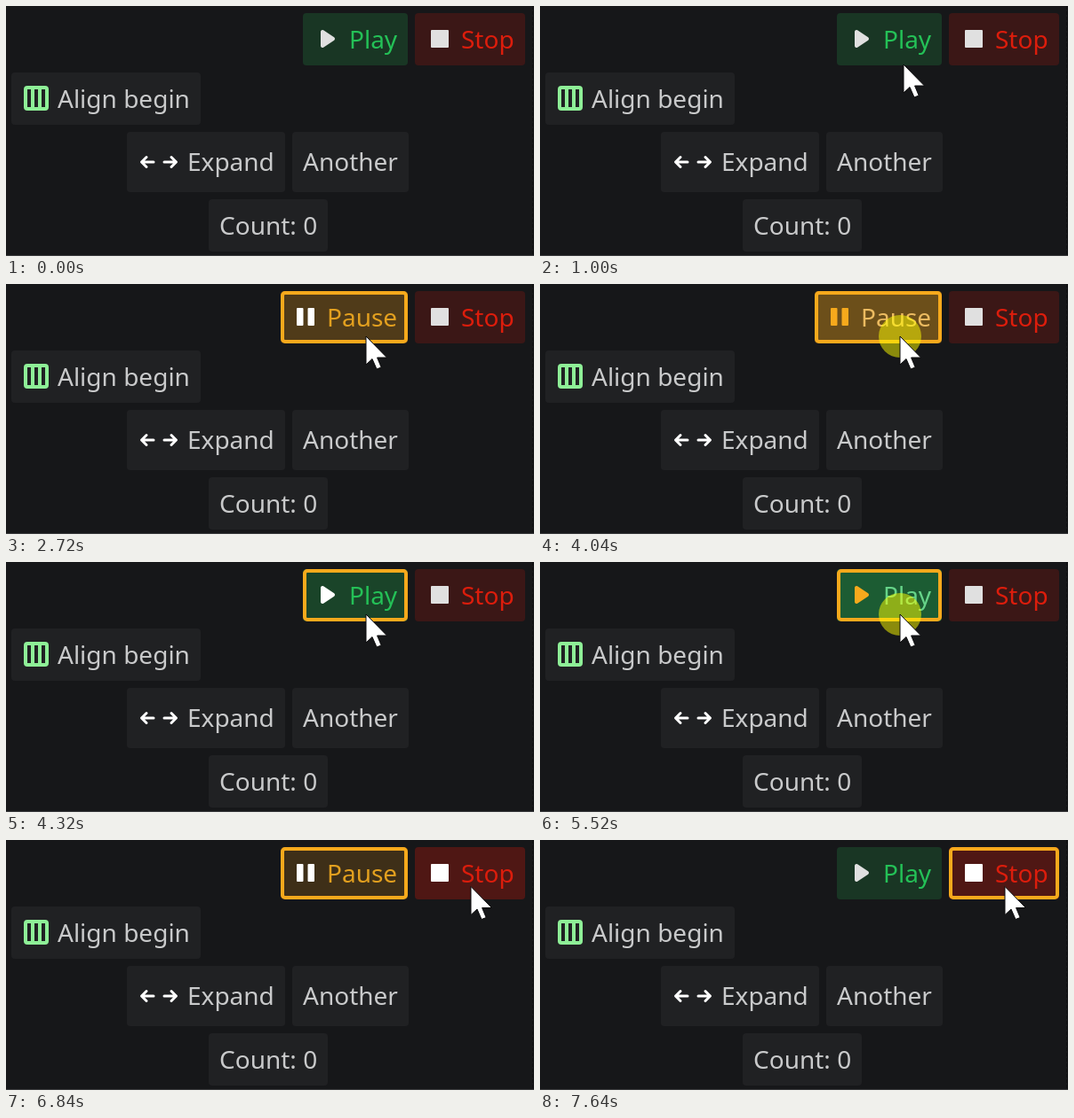
An HTML page for the animation above (8000 ms loop, 594 by 282 pixels).

```html
<!DOCTYPE html>
<html lang="en">
<head>
<meta charset="utf-8">
<title>Toolbar buttons</title>
<style>
  html, body { margin: 0; width: 100%; height: 100%; overflow: hidden; background: #161719; }
  svg { display: block; width: 594px; height: 282px; }
  text { font: 28px "Noto Sans", "Open Sans", sans-serif; fill: #c9cacb; white-space: pre; }
  .box { fill: #202123; }
  .ring { fill: none; stroke: #f6a91c; stroke-width: 4; }
</style>
</head>
<body>
<svg viewBox="0 0 594 282">
  <rect width="594" height="282" fill="#161719"/>
  <rect y="281" width="594" height="1" fill="#3a3b3d"/>
  <path d="M592.5 0V281" stroke="#0e0f10" stroke-dasharray="4 2"/>
  <g id="fixed"></g>
  <path transform="translate(18 88) scale(2)" fill="#8eef97" fill-rule="evenodd"
    d="M3 1a2 2 0 0 0-2 2v10a2 2 0 0 0 2 2h10a2 2 0 0 0 2-2V3a2 2 0 0 0-2-2zM3 3h2v10H3zM7 3h2v10H7zM11 3h2v10h-2z"/>
  <path fill="none" stroke="#fff" stroke-width="3" stroke-linecap="round" stroke-linejoin="round"
    d="M166 176H153M158 170.5L152.5 176L158 181.5M178 176H191M186 170.5L191.500 176L186 181.500"/>
  <g id="live"></g>
  <circle id="press" r="24" fill="#ff0" fill-opacity=".5"/>
  <path id="cursor" fill="#fff" stroke="#0b0b0c" stroke-width="1" stroke-linejoin="round"
    d="M0 0V32L7 25.500L12 37L17.200 35L12.600 24H23.500Z"/>
</svg>
<script>
const LOOP = 8000;
const byId = id => document.getElementById(id);

function add(parent, tag, attrs, text) {
  const el = document.createElementNS("http://www.w3.org/2000/svg", tag);
  for (const k in attrs) el.setAttribute(k, attrs[k]);
  if (text) el.textContent = text;
  parent.append(el);
  return el;
}

// label, left, top, width, height, text x, baseline
for (const [label, x, y, width, height, tx, ty] of [
  ["Align begin", 6, 75, 213, 59, 58, 115],
  ["Expand", 136, 142, 178, 68, 204, 186],
  ["Another", 322, 142, 131, 68, 334, 186],
  ["Count: 0", 228, 218, 134, 59, 240, 258],
]) {
  add(byId("fixed"), "rect", { class: "box", x, y, width, height, rx: 4 });
  add(byId("fixed"), "text", { x: tx, y: ty }, label);
}

// fill and ink are listed as [normal, hover, pressed]
const kinds = {
  Play: {
    x: 334, w: 118, tx: 386,
    icon: "M354 29a2 2 0 0 1 3.100-1.660l12 8a2 2 0 0 1 0 3.320l-12 8a2 2 0 0 1-3.100-1.660z",
    fill: ["#193624", "#1a4429", "#1c5c33"], ink: ["#24c157", "#24c157", "#66d489"],
  },
  Pause: {
    x: 309, w: 143, tx: 361,
    icon: "M328 27h5.500a1 1 0 0 1 1 1v18a1 1 0 0 1-1 1H328a1 1 0 0 1-1-1V28a1 1 0 0 1 1-1z" +
          "M340.500 27h5.500a1 1 0 0 1 1 1v18a1 1 0 0 1-1 1h-5.500a1 1 0 0 1-1-1V28a1 1 0 0 1 1-1z",
    fill: ["#3e2f18", "#503b19", "#6c4f1a"], ink: ["#e3a01f", "#e3a01f", "#ecbb61"],
  },
  Stop: {
    x: 460, w: 124, tx: 512,
    icon: "M479 27h18a1 1 0 0 1 1 1v18a1 1 0 0 1-1 1h-18a1 1 0 0 1-1-1V28a1 1 0 0 1 1-1z",
    fill: ["#3b1716", "#4f1714", "#6f1812"], ink: ["#dc1d0c", "#dc1d0c", "#e8604f"],
  },
};
const iconInk = ["#e0e0e0", "#fff", "#f6a91c"];

for (const name in kinds) {
  const k = kinds[name];
  k.g = add(byId("live"), "g", {});
  k.box = add(k.g, "rect", { x: k.x, y: 8, width: k.w, height: 59, rx: 4 });
  k.mark = add(k.g, "path", { d: k.icon });
  k.label = add(k.g, "text", { x: k.tx, y: 48 }, name);
  k.ring = add(k.g, "rect", { class: "ring", x: k.x + 2, y: 10, width: k.w - 4, height: 55, rx: 3 });
}

// time, left button, its state, stop state, focused button
const states = [
  [0, "Play", 0, 0, ""],
  [1120, "Play", 1, 0, ""],
  [2400, "Play", 2, 0, "Play"],
  [2720, "Pause", 1, 0, "Pause"],
  [4040, "Pause", 2, 0, "Pause"],
  [4320, "Play", 1, 0, "Play"],
  [5520, "Play", 2, 0, "Play"],
  [5840, "Pause", 1, 0, "Pause"],
  [6640, "Pause", 0, 1, "Pause"],
  [7240, "Pause", 0, 2, "Stop"],
  [7640, "Play", 0, 1, "Stop"],
];

// time, pointer tip
const moves = [
  [600, 471, 199], [720, 453, 160], [800, 434, 119], [920, 418, 85],
  [1000, 409, 66], [1120, 406, 60], [1200, 405, 59],
  [6440, 418, 59], [6520, 446, 57], [6640, 482, 55], [6720, 512, 53.500], [6840, 523, 52.500],
];

const at = (table, t) => table.findLast(row => row[0] <= t);

function paint(name, shown, state, focus) {
  const k = kinds[name];
  k.g.style.display = shown ? "" : "none";
  k.box.style.fill = k.fill[state];
  k.label.style.fill = k.ink[state];
  k.mark.style.fill = iconInk[focus ? Math.max(1, state) : state];
  k.ring.style.display = focus ? "" : "none";
}

function draw(t) {
  const [, left, leftState, stopState, focus] = at(states, t);
  for (const name of ["Play", "Pause"]) paint(name, name === left, leftState, focus === name);
  paint("Stop", true, stopState, focus === "Stop");

  const tip = at(moves, t);
  const down = leftState === 2 || stopState === 2;
  byId("cursor").style.display = tip ? "" : "none";
  byId("press").style.display = tip && down ? "" : "none";
  if (!tip) return;
  const place = `translate(${tip[1]} ${tip[2]})`;
  byId("cursor").setAttribute("transform", place);
  byId("press").setAttribute("transform", place);
}

const start = performance.now();
function tick() {
  draw((performance.now() - start) % LOOP);
  requestAnimationFrame(tick);
}
tick();
</script>
</body>
</html>
```
